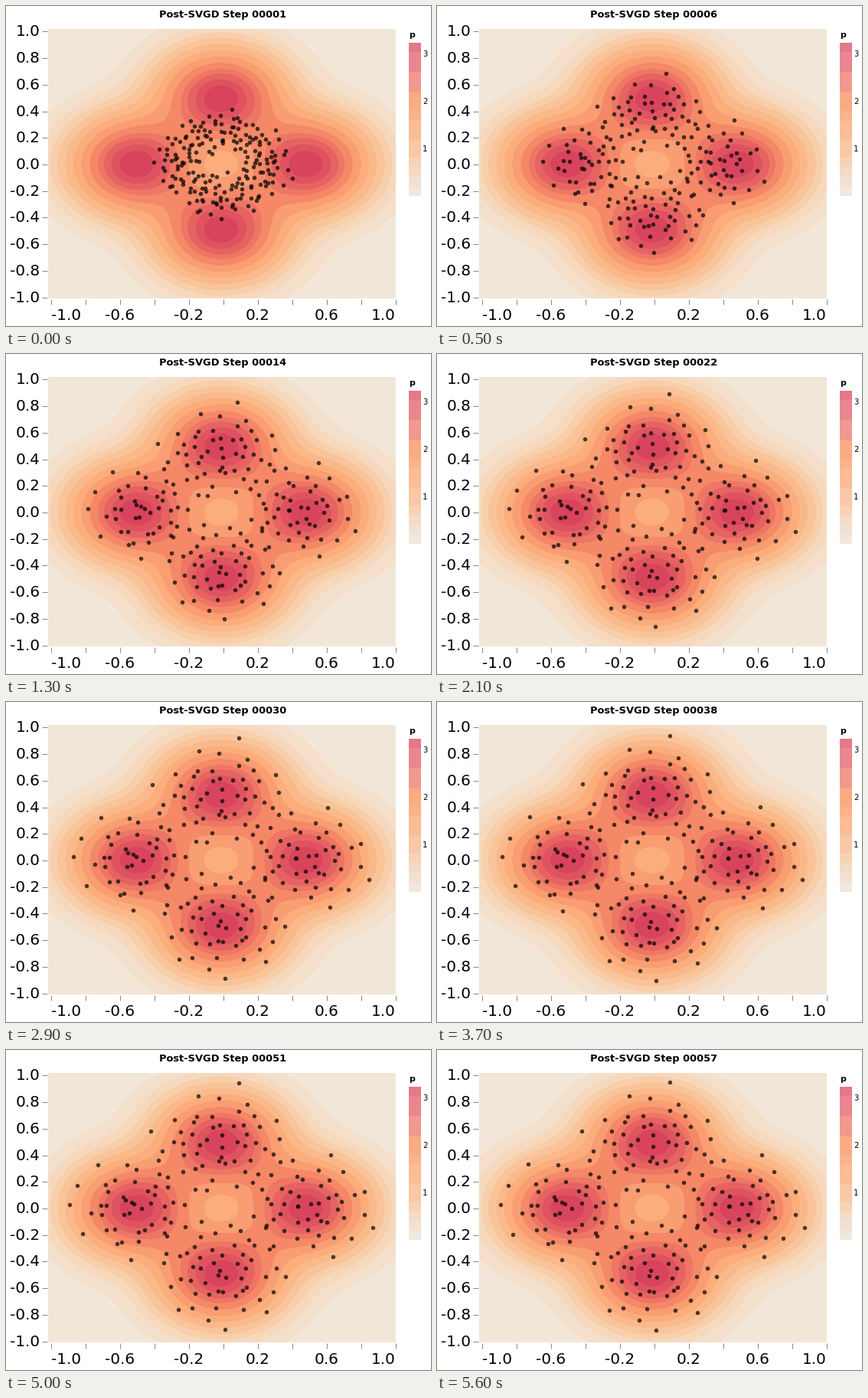
Animation of 555 by 418 pixels, one loop 5.81 s. Source, as a matplotlib script:

```python
import numpy as np
import matplotlib.pyplot as plt
from matplotlib.animation import FuncAnimation
from matplotlib.colors import to_rgb
from matplotlib.patches import Rectangle

W, H, DPI = 555, 418, 64
LOOP, TICK, STEP_MS, STEPS = 5810, 35, 100, 57
CX, CY, SX, SY = 283, 206, 225, 173.5    # plot centre and pixels per unit
LEFT, RIGHT, TOP, BOTTOM = 55, 509, 30, 382
VAR = 0.05
MODES = [(0.5, 0), (0, 0.5), (-0.5, 0), (0, -0.5)]

LEVELS = [0.06, 0.16, 0.28, 0.42, 0.62, 0.88, 1.2, 1.6, 2.0, 2.3, 2.64, 2.95]
SHADES = ["#f2e6d8", "#f4dfcb", "#f6d8bd", "#f8cfab", "#f9c499", "#fab98a",
          "#fbad7b", "#f99d73", "#f48867", "#ee7664", "#e66361", "#df5360",
          "#d8445c"]
KEY = [(48, "#e5788b"), (60, "#ea868f"), (86, "#f2998f"), (113, "#f9ab82"),
       (137, "#fab38b"), (150, "#fbbd96"), (174, "#f9c8a6"), (198, "#f7d2b5"),
       (210, "#f5dac5"), (222, "#f2e1d3"), (236, "#f0e8df"), (248, None)]


def density(x, y):
    total = sum(np.exp(-((x - a) ** 2 + (y - b) ** 2) / (2 * VAR))
                for a, b in MODES)
    return total / (2 * np.pi * VAR)


def heat():
    x = (np.arange(LEFT, RIGHT) + 0.5 - CX + 2) / SX
    y = (CY + 0.5 - np.arange(TOP, BOTTOM) - 0.5) / SY
    band = np.digitize(density(*np.meshgrid(x, y)), LEVELS)
    return np.array([to_rgb(c) for c in SHADES])[band]


def settled(per_mode=49):
    """Evenly spread samples of the four-mode mixture."""
    rng = np.random.default_rng(12)
    i = np.arange(per_mode)
    r = np.sqrt(-2 * VAR * np.log(1 - 0.86 * (i + 0.5) / per_mode))
    parts = []
    for k, mode in enumerate(MODES):
        a = i * np.pi * (3 - 5 ** 0.5) + 1.7 * k
        parts.append(np.c_[r * np.cos(a), r * np.sin(a)] + mode)
    pts = np.concatenate(parts)
    return pts + rng.uniform(-0.035, 0.035, pts.shape)


def gathered(pts):
    """Pull the settled samples back into the starting disc."""
    rng = np.random.default_rng(5)
    r = np.hypot(pts[:, 0], pts[:, 1])
    a = np.arctan2(pts[:, 1], pts[:, 0])
    reach = 0.84 + 0.08 * np.cos(4 * a)
    r0 = 0.40 * (r / reach) ** 0.85
    a0 = a + 0.12 * np.sin(4 * a)
    disc = np.c_[r0 * np.cos(a0), r0 * np.sin(a0)]
    return disc + rng.uniform(-0.02, 0.02, pts.shape)


fig = plt.figure(figsize=(W / DPI, H / DPI), dpi=DPI, facecolor="white")
ax = fig.add_axes([0, 0, 1, 1])
ax.axis("off")


def label(x, y, s, px, ha="center", va="baseline", weight="normal"):
    return ax.text(x, y, s, fontsize=px * 72 / DPI, ha=ha, va=va,
                   weight=weight, family="DejaVu Sans", color="black")


def line(xs, ys):
    ax.plot(xs, ys, color="#888888", lw=72 / DPI, solid_capstyle="butt")


ax.imshow(heat(), extent=(LEFT, RIGHT, BOTTOM, TOP), aspect="auto",
          interpolation="nearest")

for n in range(-5, 6):
    x, y = CX + n * SX / 5 + 0.5, round(CY - n * SY / 5) + 0.5
    line([x, x], [383, 390])
    line([47, 54], [y, y])
    label(44.5, y + 6.5, f"{n / 5:.1f}", 20, "right")
for n, ha in [(-5, "left"), (-3, "center"), (-1, "center"),
              (1, "center"), (3, "center"), (5, "right")]:
    label(CX + n * SX / 5 + 0.5, 410, f"{n / 5:.1f}", 20, ha)

for (y0, shade), (y1, _) in zip(KEY, KEY[1:]):
    ax.add_patch(Rectangle((526, y0), 16, y1 - y0, color=shade, lw=0))
label(526, 41, "p", 11, "left", weight="bold")
for n in (1, 2, 3):
    label(544, 248 - 62 * n + 4, str(n), 10, "left")

title = label(283.5, 15, "", 13, weight="bold")
dots, = ax.plot([], [], "o", color="black", alpha=0.7, mew=0,
                ms=5.5 * 72 / DPI)
dots.set_snap(False)
ax.set_xlim(0, W)
ax.set_ylim(H, 0)

END = settled()
START = gathered(END)


def draw(i):
    n = min((i * TICK + TICK - 1) // STEP_MS, STEPS - 1)
    ease = 1 - np.exp(-0.19 * n ** 0.8)
    x, y = (START + (END - START) * ease).T
    dots.set_data(CX + x * SX, CY - y * SY)
    title.set_text(f"Post-SVGD Step {n + 1:05d}")
    return dots, title


anim = FuncAnimation(fig, draw, frames=LOOP // TICK, interval=TICK,
                     repeat=True, repeat_delay=0, blit=False)
plt.show()
```
